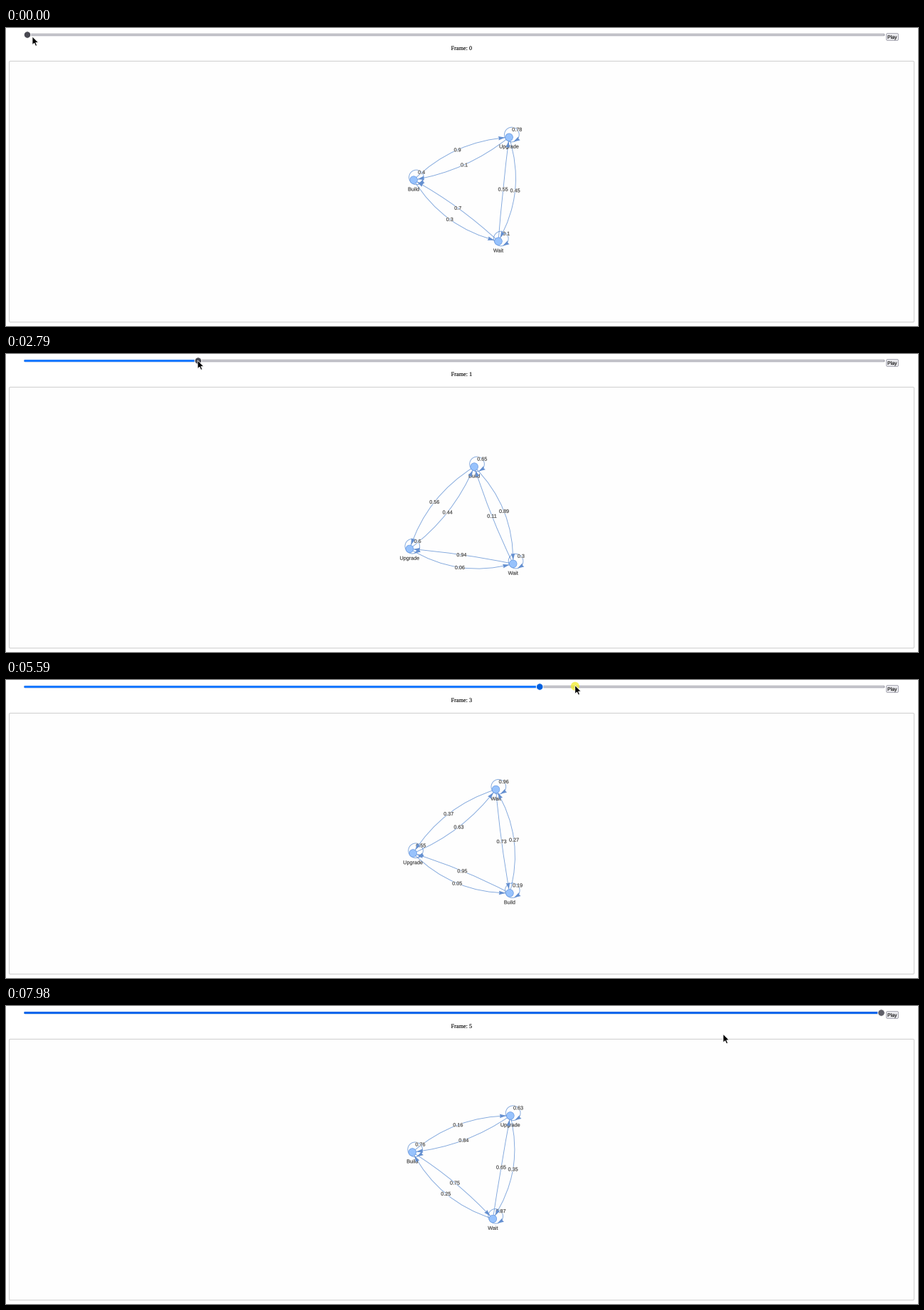
A matplotlib script that plays this animation: 1280x418 px, repeating every 8000 ms.

```python
import numpy as np
import matplotlib.pyplot as plt
from matplotlib.animation import FuncAnimation
from matplotlib.patches import Circle, FancyBboxPatch, PathPatch, Polygon
from matplotlib.path import Path
from matplotlib.textpath import TextPath

W, H, DPI = 1280, 418, 64
PX = 72 / DPI                      # one pixel in points
ZOOM = 0.516                       # page pixels to stage pixels
LOOP_MS, TICK_MS, STEPS_PER_S = 8000, 20, 15

SANS, SERIF = {"family": "Liberation Sans"}, {"family": "Liberation Serif"}
LINE, ARROW, FILL, RIM = "#7ea5dc", "#648fd0", "#97c2fc", "#6699e4"
INK = "#343434"
NAMES = {"B": "Build", "U": "Upgrade", "W": "Wait"}
MIDDLE = np.array((639.1, 226.2))
SPREAD = 84.7                      # centre of the triangle to a node
NODE_R, LOOP_R, ARROW_LEN = 5.3, 20 * ZOOM, 18 * ZOOM
LABEL = 14 * ZOOM

# Bearing of Build, sense of rotation, loop weights, weights of outer edges.
# Every inner edge carries the rest to 1.
GRAPHS = [
    (185.9, 1, (0.4, 0.78, 0.1), dict(BU=0.9, BW=0.3, UW=0.45)),
    (278.2, -1, (0.65, 0.6, 0.3), dict(BU=0.56, BW=0.89, UW=0.06)),
    (161.6, 1, (0.9, 0.06, 0.6), dict(BU=0.27, BW=0.79, UW=0.02)),
    (52.4, 1, (0.19, 0.55, 0.96), dict(UB=0.05, BW=0.27, WU=0.37)),
    (246.3, 1, (0.25, 0.77, 0.45), dict(UB=0.86, WB=0.51, UW=0.86)),
    (189.6, 1, (0.76, 0.63, 0.87), dict(BU=0.16, WB=0.25, UW=0.35)),
]
SWITCHES = (30, 53, 70, 92, 118)   # steps at which the next graph appears
DRAGS = ((6, 27), (45, 52), (62, 69), (81, 90), (101, 114))

# Pointer: step, x, y
POINTER = np.array([
    (0, 37, 12), (6, 30, 9), (14, 166, 8.5), (19, 293, 8), (25, 304, 8.3),
    (30, 304, 8.3), (42, 269, 9), (45, 270, 8), (53, 499.6, 6),
    (62, 506, 8), (70, 686.4, 11), (80, 750, 8), (95, 932.6, 6.8),
    (101, 989, 8), (114, 1125, 8), (120, 1006.6, 39.5)])
CURSOR = np.array([(0, 0), (0, 11.6), (2.7, 9.1), (4.6, 13.3), (6.5, 12.5),
                   (4.7, 8.4), (8.3, 8.3)])
TRACK_L, TRACK_R, TRACK_Y, TRACK_H = 25.5, 1233, 9.55, 6 * ZOOM
THUMB_0, THUMB_GAP = 30, 239.7

fig = plt.figure(figsize=(W / DPI, H / DPI), dpi=DPI, facecolor="white")
ax = fig.add_axes((0, 0, 1, 1))
ax.set(xlim=(0, W), ylim=(H, 0))
ax.axis("off")


def unit(v):
    return v / np.hypot(*v)


def polar(deg):
    return np.array((np.cos(np.radians(deg)), np.sin(np.radians(deg))))


def text_path(s, x, y, size, font=SANS):
    """Outline of s centred on x, with its digits centred on y."""
    path = TextPath((0, 0), s, size=size, prop=font)
    extent = path.get_extents()
    shift = x - (extent.x0 + extent.x1) / 2, y + 0.35 * size
    return Path(path.vertices * (1, -1) + shift, path.codes)


def add(paths, z, fill="none", edge="none", lw=0.0):
    return ax.add_patch(PathPatch(
        Path.make_compound_path(*paths), facecolor=fill, edgecolor=edge,
        linewidth=lw * PX, zorder=z))


def add_text(paths, z, color=INK):
    return add(paths, z, color, color, 0.12)


def box(x0, y0, x1, y1, r, z, fill, edge="none", lw=0.0):
    return ax.add_patch(FancyBboxPatch(
        (x0, y0), x1 - x0, y1 - y0, facecolor=fill, edgecolor=edge,
        boxstyle=f"round,pad=0,rounding_size={r}", linewidth=lw * PX,
        zorder=z))


def arrow_head(tip, heading):
    c, s = unit(heading) * ARROW_LEN
    shape = np.array([(0, 0), (-1, 0.3), (-0.9, 0), (-1, -0.3), (0, 0)])
    return Path(tip + shape @ np.array([(c, s), (-s, c)]), closed=True)


def edge_parts(a, b, mid):
    """Curve from a to b through mid, and its arrow head at b."""
    ctrl = 2 * mid - (a + b) / 2
    t = np.linspace(0, 1, 300)[:, None]
    pts = (1 - t) ** 2 * a + 2 * t * (1 - t) * ctrl + t ** 2 * b
    gap = np.hypot(*(pts - b).T)
    tip = pts[gap > NODE_R][-1]
    tail = pts[gap > NODE_R + ARROW_LEN][-1]
    curve = Path([a, ctrl, b], [Path.MOVETO, Path.CURVE3, Path.CURVE3])
    return curve, arrow_head(tip, tip - tail)


def layout(bearing, turn):
    """Equilateral triangle whose bounding box sits in the middle."""
    pts = np.array([SPREAD * polar(bearing + 120 * turn * k)
                    for k in range(3)])
    return pts + MIDDLE - (pts.min(0) + pts.max(0)) / 2


def build_graph(number, bearing, turn, loops, outer):
    pts = layout(bearing, turn)
    nodes = dict(zip(NAMES, pts))
    lines, arrows, labels = [], [], []

    def weigh(w, x, y):
        labels.append(text_path(f"{w:.2g}", x, y, LABEL))

    def connect(a, b, mid, w):
        curve, head = edge_parts(a, b, mid)
        lines.append(curve)
        arrows.append(head)
        weigh(w, *mid)

    for p, w in zip(pts, loops):
        c = p + (3.8, -3.7)
        lines.append(Path.circle(c, LOOP_R))
        arrows.append(arrow_head(c + LOOP_R * polar(77), polar(150)))
        weigh(w, *(c + LOOP_R * polar(-45)))
    for (i, j), w in outer.items():
        a, b = nodes[i], nodes[j]
        mid = (a + b) / 2
        out = unit(mid - pts.mean(0))
        lean = out @ polar(221)    # both edges sag away from the upper left
        connect(a, b, mid + out * (14.9 - 1.5 * lean), w)
        connect(b, a, mid - out * (5 + 5 * lean), 1 - w)

    names = [text_path(NAMES[k], p[0], p[1] + 12.8, LABEL)
             for k, p in nodes.items()]
    title = text_path(f"Frame: {number}", 639.3, 28, 16 * ZOOM, SERIF)
    return [
        add(lines, 2, edge=LINE, lw=0.9),
        add(labels, 3, "white", "white", 1.1),
        add_text(labels, 4),
        add([Path.circle(p, NODE_R) for p in pts], 5, FILL, RIM, 0.7),
        add_text(names, 6),
        add(arrows, 7, ARROW),
        add_text([title], 7, "black"),
    ]


def timeline():
    """Pointer position, drag state and slider value for every step."""
    value, out = 0, []
    for s in range(LOOP_MS * STEPS_PER_S // 1000 + 1):
        x, y = (np.interp(s, POINTER[:, 0], POINTER[:, i]) for i in (1, 2))
        held = any(a <= s < b for a, b in DRAGS)
        if held:
            value = int(np.clip(round((x - THUMB_0) / THUMB_GAP), 0, 5))
        out.append((x, y, held, value))
    return out


# Page furniture
top, bottom = TRACK_Y - TRACK_H / 2, TRACK_Y + TRACK_H / 2
box(4.5, 46.5, 1274.5, 412.5, 1.5, 1, "#fefefe", "#cfcfcf", 1)
box(1235.5, 7.5, 1252.5, 17.5, 2, 1, "#e9e9ed", "#8f8f9d", 0.7)
add_text([text_path("Play", 1244, 12.7, 13.3 * ZOOM)], 2, "black")
track = box(TRACK_L + 0.3, top + 0.3, TRACK_R, bottom - 0.3, 1.2, 1,
            "#e0e0e5", "#8f8f9d", 0.7)
bar = box(TRACK_L, top, TRACK_L + 1, bottom, 0.5, 8, "#1a7aff")
thumb = ax.add_patch(Circle((THUMB_0, TRACK_Y), 4.8, edgecolor="white",
                            linewidth=PX, zorder=9))
mark = ax.add_patch(Circle((0, 0), 6, linewidth=0, zorder=10,
                           facecolor=(0.95, 0.93, 0.16, 0.75)))
cursor = ax.add_patch(Polygon(CURSOR, closed=True, facecolor="black",
                              edgecolor="white", linewidth=0.7 * PX,
                              zorder=11))
graphs = [build_graph(i, *g) for i, g in enumerate(GRAPHS)]
STEPS = timeline()


def update(i):
    step = (i * TICK_MS + TICK_MS) * STEPS_PER_S // 1000
    x, y, held, value = STEPS[step]
    hover = held or y < 20

    shown = sum(step >= s for s in SWITCHES)
    for k, group in enumerate(graphs):
        for artist in group:
            artist.set_visible(k == shown)

    thumb_x = THUMB_0 + value * THUMB_GAP
    thumb.center = thumb_x, TRACK_Y
    thumb.set_facecolor("#0060df" if held else "#484851" if hover
                        else "#5f5f69")
    track.set_edgecolor("#7b7b88" if hover else "#8f8f9d")
    bar.set_width(thumb_x - TRACK_L)
    bar.set_facecolor("#1a7aff" if hover else "#0766ec")
    bar.set_visible(value > 0)

    mark.set_visible(held)
    mark.center = x, y + 1
    cursor.set_xy(CURSOR + (x, y))
    return [track, bar, thumb, mark, cursor]


anim = FuncAnimation(fig, update, frames=LOOP_MS // TICK_MS, interval=TICK_MS,
                     repeat=True, repeat_delay=0, blit=False)
plt.show()
```
